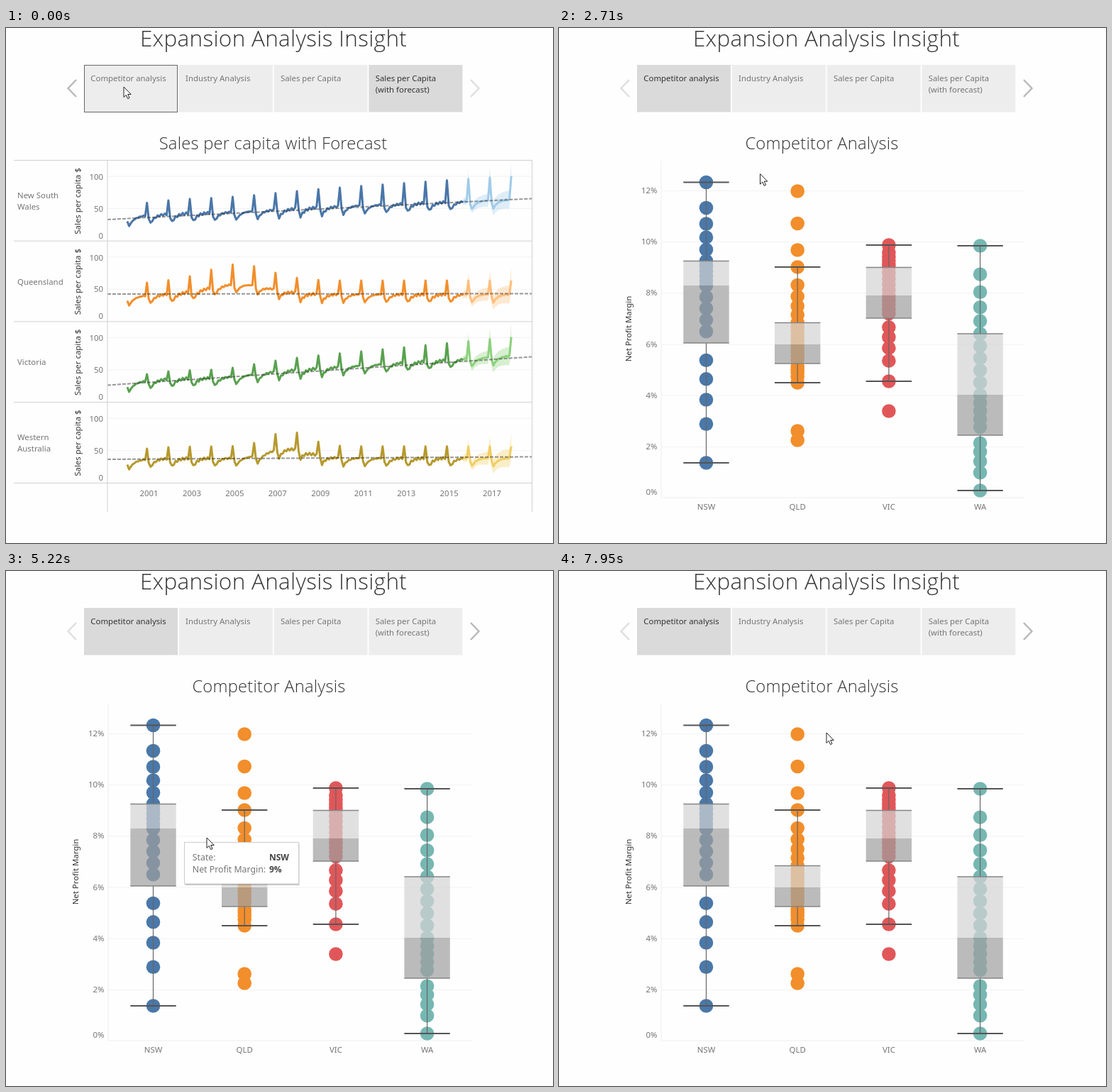
Recreate the animation shown at these times as an HTML page. Size 771 by 726 pixels, loop 8 s.

```html
<!DOCTYPE html>
<html lang="en">
<head>
<meta charset="utf-8">
<title>Expansion Analysis Insight</title>
<style>
html, body { margin: 0; height: 100%; overflow: hidden; background: #fefefe; }
svg { display: block; width: 100%; height: 100%; }
text { font: 11.4px "Noto Sans", "Open Sans", sans-serif; fill: #757575; }
text.big, text.head { font-family: "Open Sans", "Noto Sans", sans-serif; font-weight: 300; fill: #333; }
text.big { font-size: 31.5px; letter-spacing: .3px; }
text.head { font-size: 23.8px; letter-spacing: .2px; }
text.dark { fill: #333; }
.tip text { font-size: 12.3px; }
.tip .val { font-size: 12px; font-weight: 600; fill: #444; }
</style>
</head>
<body>
<svg id="stage" viewBox="0 0 771 726"></svg>
<script>
const LOOP = 8000, SWITCH = 670, LAG = 70, PANEL = 113.7, MONTH = 2.517;

const text = (x, y, s, cls = '', anchor = 'start', extra = '') =>
  `<text x="${x}" y="${y}" class="${cls}" text-anchor="${anchor}" ${extra}>${s}</text>`;
const line = (x1, y1, x2, y2, color, w = 1, extra = '') =>
  `<path d="M${x1} ${y1}L${x2} ${y2}" stroke="${color}" stroke-width="${w}" ${extra}/>`;
const rect = (x, y, w, h, fill, extra = '') =>
  `<rect x="${x}" y="${y}" width="${w}" height="${h}" fill="${fill}" ${extra}/>`;
const poly = (pts, attrs) =>
  `<polyline points="${pts.map(p => p.map(v => v.toFixed(1))).join(' ')}" ${attrs}/>`;
const upright = (x, y, s) =>
  text(0, 0, s, 'dark', 'middle', `transform="translate(${x} ${y}) rotate(-90)"`);
const mix = (a, b, k) => a + (b - a) * k;

// Sales level: a straight climb plus one hump; December is the level times `rise`
const regions = [
  { name: ['New South', 'Wales'], color: '#4a76a8', soft: '#a0cbe8', trend: [270, 240.5],
    base: 33.5, slope: 1.2, hump: -2, at: 5, width: 3, rise: 1.66 },
  { name: ['Queensland'], color: '#f28e2b', soft: '#ffbe7d', trend: [375, 374.5],
    base: 35, slope: 0, hump: 14, at: 5.2, width: 2, rise: 1.65 },
  { name: ['Victoria'], color: '#59a14f', soft: '#8cd17d', trend: [503.5, 463.5],
    base: 27, slope: 1.95, hump: -4, at: 4.5, width: 2, rise: 1.48 },
  { name: ['Western', 'Australia'], color: '#b6992d', soft: '#f1ce63', trend: [608, 604.5],
    base: 31.5, slope: 0, hump: 13, at: 7.5, width: 1.3, rise: 1.63 }
];

function sales(r, m) {
  const year = m / 12, k = m % 12;
  const level = r.base + r.slope * year + r.hump * Math.exp(-(((year - r.at) / r.width) ** 2)) - 5 * Math.exp(-year);
  if (k === 11) return level * r.rise;
  const season = k ? 4 - 13 * Math.exp((1 - k) / 2.5) : -1;
  return level + season * .9 + 1.6 * Math.sin(k * 2.1 + m);
}

function forecastChart() {
  let s = text(376.5, 171, 'Sales per capita with Forecast', 'head', 'middle');
  regions.forEach((r, i) => {
    const off = i * PANEL, mid = 244 + off;
    s += line(143, 209 + off, 741, 209 + off, '#f2f2f2') + line(143, 254.5 + off, 741, 254.5 + off, '#f2f2f2');
    s += line(11, 186.5 + off, 742, 186.5 + off, '#d0d0d0');
    r.name.forEach((n, k) => s += text(16, mid + 4 + (k - (r.name.length - 1) / 2) * 16, n));
    s += upright(105, mid, 'Sales per capita $');
    [[100, 214], [50, 258.5], [0, 296.5]].forEach(([v, y]) => s += text(137, y + off, v, '', 'end'));

    const pts = Array.from({ length: 216 }, (_, m) => [171 + m * MONTH, 300 + off - sales(r, m)]);
    const future = pts.slice(188);
    const spread = dir => future.map(([x, y], k) => [x, y + dir * (5 + k * .3 + (k % 12 === 3 ? 5 : 0))]);
    const pen = 'fill="none" stroke-width="3" stroke-linejoin="round" stroke=';
    s += poly([...spread(-1), ...spread(1).reverse()], `fill="${r.soft}" opacity=".35"`);
    s += poly(future, `${pen}"${r.soft}"`) + poly(pts.slice(0, 189), `${pen}"${r.color}"`);
    s += line(143, r.trend[0], 741, r.trend[1], 'rgba(50,50,50,.5)', 2, 'stroke-dasharray="5 2"');
  });
  s += line(11, 641.5, 742, 641.5, '#d0d0d0');
  s += line(143, 186, 143, 682, '#d0d0d0') + line(741.5, 186, 741.5, 682, '#d0d0d0');
  for (let k = 0; k < 9; k++) s += text(201.5 + k * 60.45, 660, 2001 + 2 * k, '', 'middle');
  return s;
}

// box: upper whisker, box top, median, box bottom, lower whisker
const states = [
  { name: 'NSW', color: '#4a78a9', tipW: 161, box: [217.5, 328.5, 363, 444, 613], outliers: [] },
  { name: 'QLD', color: '#f28e2b', tipW: 161, box: [337, 415.5, 446, 473, 500], outliers: [230, 275.5, 313, 568, 581] },
  { name: 'VIC', color: '#e15759', tipW: 150, box: [306, 337.5, 377, 409, 498], outliers: [540] },
  { name: 'WA', color: '#76b7b2', tipW: 151, box: [307, 431, 517, 574, 652], outliers: [] }
];

// Five steps per quartile, thinning out along the whiskers
states.forEach((c, i) => {
  const [top, q3, med, q1, low] = c.box;
  c.x = 207.5 + i * 128.7;
  c.dots = [...c.outliers];
  for (let k = 0; k < 5; k++) {
    const even = k / 5, thin = even ** .7;
    c.dots.push(mix(top, q3, thin), mix(q3, med, even), mix(med, q1, even), mix(low, q1, thin));
  }
  c.dots.sort((a, b) => a - b);
});

const dot = (c, y, paint) => `<circle cx="${c.x}" cy="${y}" r="9.8" ${paint}/>`;

function boxChart() {
  let s = text(370.5, 171, 'Competitor Analysis', 'head', 'middle');
  for (let k = 0; k < 6; k++) s += line(144, 229.5 + k * 72.2, 656, 229.5 + k * 72.2, '#f2f2f2');
  for (let k = 0; k < 7; k++) s += text(138.5, Math.min(233 + k * 72.2, 658), `${12 - 2 * k}%`, '', 'end');
  s += line(144, 187, 144, 662, '#eee') + line(144, 662, 656, 662, '#eee');
  s += upright(102, 424, 'Net Profit Margin');
  states.forEach(c => {
    const x = c.x, [top, q3, med, q1, low] = c.box;
    const bar = (y, color, w) => line(x - 32.2, y, x + 32.2, y, color, w);
    s += c.dots.map(y => dot(c, y, `fill="${c.color}"`)).join('');
    s += rect(x - 32.2, q3, 64.4, med - q3, 'rgba(212,212,212,.7)');
    s += rect(x - 32.2, med, 64.4, q1 - med, 'rgba(160,160,160,.7)');
    s += line(x, top, x, q3, '#666', 1.2) + line(x, q1, x, low, '#666', 1.2);
    s += bar(q3, '#858585', 1.4) + bar(q1, '#858585', 1.4) + bar(top, '#555', 2) + bar(low, '#555', 2);
    s += text(x, 679, c.name, '', 'middle');
  });
  return s;
}

const tabNames = [['Competitor analysis'], ['Industry Analysis'], ['Sales per Capita'],
  ['Sales per Capita', '(with forecast)']];

function tabs(t) {
  const switched = t >= SWITCH;
  let s = '';
  tabNames.forEach((rows, i) => {
    const x = 110 + i * 133.8;
    const on = i === 0 ? t >= 450 : i === 3 && !switched;
    s += rect(x, 52, 132, 66.5, on ? '#dadada' : '#ededed');
    rows.forEach((r, k) => s += text(x + 9.3, 75 + 16 * k, r, on ? 'dark' : ''));
  });
  if (pointerAt(t).y < 118) s += rect(110.5, 52.5, 131, 66, 'none', 'stroke="#666"');
  const arrow = (x, dx, strong) =>
    `<path d="M${x} 73l${dx} 12l${-dx} 12" fill="none" stroke="${strong ? '#b8b8b8' : '#dedede'}" stroke-width="2.4"/>`;
  return s + arrow(99, -11.5, !switched) + arrow(655, 11.5, switched);
}

// Pointer stops: [arrival, departure, x, y, end of tooltip if one opens]
const stops = [
  [0, 1070, 166, 83], [1400, 1400, 172, 186], [1750, 2020, 169, 147], [2640, 2640, 262, 165],
  [2900, 3080, 342, 316, 3150], [3270, 3270, 342, 224], [3350, 3560, 374.5, 223],
  [3900, 4040, 210, 613, 4080], [4290, 4340, 211, 219, 4440], [4680, 4800, 338, 581, 4850],
  [5080, 5080, 201, 344, 5290], [5220, 5220, 283, 376], [5590, 5840, 343, 429, 5900],
  [5970, 6110, 463, 397, 6190], [6390, 6390, 545, 466], [6600, 6930, 583, 498],
  [7150, 7820, 583, 545, 7840], [7940, LOOP, 377, 228]
];

function pointerAt(t) {
  const i = Math.max(1, stops.findIndex(s => s[0] > t));
  const [, leave, x, y] = t >= stops[stops.length - 1][0] ? stops[stops.length - 1] : stops[i - 1];
  const [arrive, , nx, ny] = stops[i];
  const k = Math.min(1, Math.max(0, (t - leave) / (arrive - leave)));
  return t <= leave ? { x, y } : { x: mix(x, nx, k), y: mix(y, ny, k) };
}

// The dot under a pointer, if any
function hit(x, y) {
  const c = states.find(c => Math.abs(c.x - x) < 13);
  if (!c) return null;
  const gap = d => Math.abs(d - y - 6);
  const near = c.dots.reduce((a, b) => gap(b) < gap(a) ? b : a);
  return gap(near) < 13 ? { c, y: near } : null;
}

function tooltip(t) {
  const stop = stops.find(s => t >= s[0] && t < s[4]);
  if (!stop) return '';
  const { c, y: dotY } = hit(stop[2], stop[3]);
  const late = pointerAt(Math.max(t - LAG, stop[0])), now = pointerAt(t);
  const x = Math.round(late.x) + 9.5, y = Math.round(late.y) + 22.5;
  const ring = hit(now.x, now.y) ? dot(c, dotY, 'fill="none" stroke="#333" stroke-width="1.5"') : '';
  return ring + '<g class="tip">' + rect(x + 1, y + 2, c.tipW, 58.5, 'rgba(0,0,0,.22)')
    + rect(x, y, c.tipW, 58.5, '#fff', 'stroke="#ccc"')
    + text(x + 11.3, y + 25.5, 'State:') + text(x + 119.5, y + 25.5, c.name, 'val')
    + text(x + 11.3, y + 42.5, 'Net Profit Margin:')
    + text(x + 119.5, y + 42.5, `${Math.round((662 - dotY) / 36.1)}%`, 'val') + '</g>';
}

const ARROW = 'M0 0V14.5L3.3 11.4L5.6 16.6L8 15.6L5.7 10.5H10.2Z';
const HAND = 'M-1.5 1.5Q0-1 1.5 1.5V7Q3.5 5.5 4.5 7.5Q6.5 6.5 7.3 8.5Q9.5 8 9.5 10.5V14Q9 17 7.5 19.5H-1' +
  'Q-2.5 16-5.5 12.5Q-5.5 10-3.5 10.8L-1.5 12.5Z';

function pointer(t) {
  const { x, y } = pointerAt(t), late = pointerAt(Math.max(0, t - LAG));
  const shape = hit(late.x, late.y) ? HAND : ARROW;
  return `<path d="${shape}" transform="translate(${x} ${y})" fill="#fff" stroke="#222"/>`;
}

const stage = document.getElementById('stage');
stage.innerHTML = text(377, 26, 'Expansion Analysis Insight', 'big', 'middle')
  + `<g id="tabs"></g><g id="before">${forecastChart()}</g><g id="after">${boxChart()}</g><g id="over"></g>`;
const [tabLayer, before, after, over] = ['tabs', 'before', 'after', 'over'].map(id => document.getElementById(id));

function draw(now) {
  const t = now % LOOP, switched = t >= SWITCH;
  tabLayer.innerHTML = tabs(t);
  before.style.display = switched ? 'none' : '';
  after.style.display = switched ? '' : 'none';
  over.innerHTML = tooltip(t) + pointer(t);
}

let begin;
function tick(now) {
  begin ??= now;
  draw(now - begin);
  requestAnimationFrame(tick);
}
draw(0);
requestAnimationFrame(tick);
</script>
</body>
</html>
```
